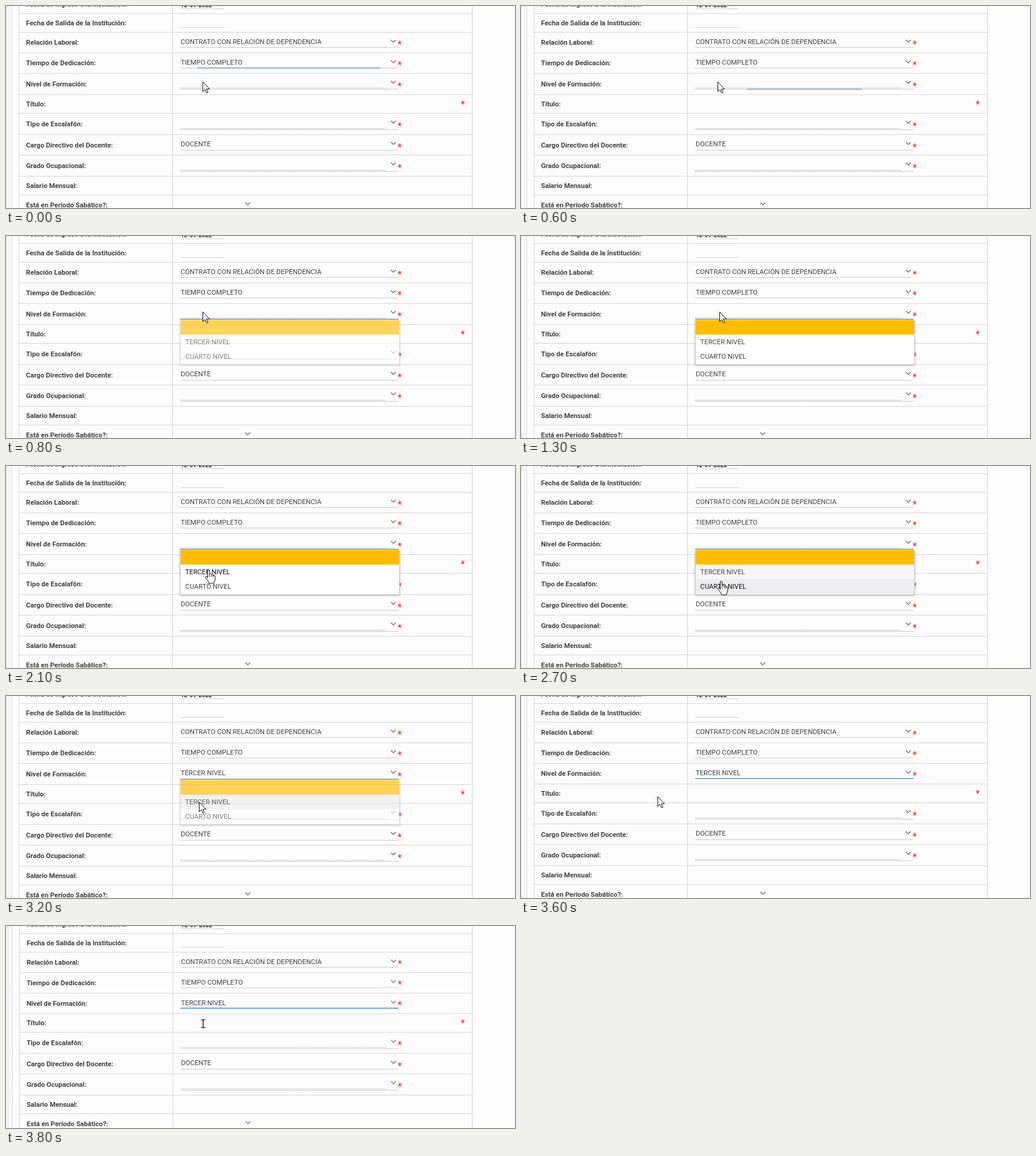
Write an HTML page with a canvas that moves like this. It is 839 px wide and 334 px high and loops after 3900 ms.

```html
<!DOCTYPE html>
<html lang="es">
<head>
<meta charset="utf-8">
<style>
html, body { margin: 0; width: 100%; height: 100%; overflow: hidden; background: #fdfdfd; }
canvas { display: block; }
</style>
</head>
<body>
<canvas id="stage" width="839" height="334"></canvas>
<script>
const stage = document.getElementById('stage');
const page = stage.getContext('2d');
const layer = document.createElement('canvas');
layer.width = stage.width;
layer.height = stage.height;
const menuLayer = layer.getContext('2d');
let ctx = page;

const LOOP = 3900, STEP = 100;
const FONT = '11.2px Roboto, sans-serif', BOLD = 'bold ' + FONT;
const INK = '#424242', BLUE = '#3a73ad', BORDER = '#d6d6d6';

// base: label baseline, field: value baseline, line: field underline
const rows = [
  { label: 'Fecha de Ingreso a la Institución:', base: 1, bottom: 12 },
  { label: 'Fecha de Salida de la Institución:', base: 32, bottom: 43 },
  { label: 'Relación Laboral:', base: 64, bottom: 77, field: 63, line: 68, value: 'CONTRATO CON RELACIÓN DE DEPENDENCIA' },
  { label: 'Tiempo de Dedicación:', base: 98, bottom: 111, field: 97, line: 102, value: 'TIEMPO COMPLETO' },
  { label: 'Nivel de Formación:', base: 133, bottom: 146, field: 131, line: 137 },
  { label: 'Título:', base: 166, bottom: 177 },
  { label: 'Tipo de Escalafón:', base: 199, bottom: 212, field: 197, line: 204 },
  { label: 'Cargo Directivo del Docente:', base: 234, bottom: 246, field: 232, line: 238, value: 'DOCENTE' },
  { label: 'Grado Ocupacional:', base: 268, bottom: 281, field: 266, line: 273 },
  { label: 'Salario Mensual:', base: 301, bottom: 312 },
  { label: 'Está en Período Sabático?:', base: 333, bottom: 346 }
];

const pointer = [
  [0, 324, 125, arrow], [1100, 324, 125, arrow], [1300, 327, 125, arrow],
  [1800, 327, 125, arrow], [1900, 329, 134, arrow], [2000, 332, 154, hand],
  [2100, 334, 171, hand], [2400, 335, 176, hand], [2600, 332, 186, hand],
  [2700, 330, 190, hand], [2800, 330, 192, hand], [3000, 333, 176, hand],
  [3100, 333, 176, hand], [3200, 318, 175, arrow], [3500, 232, 168, arrow],
  [3600, 225, 166, arrow], [3700, 275, 163, arrow], [3800, 324, 161, beam]
];
const menuAlpha = [[600, 0], [700, .3], [800, .64], [900, .9], [1000, 1], [3100, 1], [3400, 0]];
const hoverThird = [[2100, 0], [2400, 1], [2500, 1], [2700, .45], [2850, 0], [2900, .3], [3000, 1]];
const hoverFourth = [[2500, 0], [2700, 1], [2850, 1], [3000, 0]];

// Piecewise linear value at time t; column selects the number in each key
function track(keys, t, column = 1) {
  if (t <= keys[0][0]) return keys[0][column];
  for (let i = 1; i < keys.length; i++) {
    const a = keys[i - 1], b = keys[i];
    if (t <= b[0]) return a[column] + (b[column] - a[column]) * (t - a[0]) / (b[0] - a[0]);
  }
  return keys[keys.length - 1][column];
}

function rect(x, y, w, h, color) {
  ctx.fillStyle = color;
  ctx.fillRect(x, y, w, h);
}

function text(str, x, y, font = FONT, color = INK) {
  ctx.font = font;
  ctx.fillStyle = color;
  ctx.fillText(str, x, y);
}

function stroke(points, color, width) {
  ctx.beginPath();
  points.forEach(([x, y]) => ctx.lineTo(x, y));
  ctx.strokeStyle = color;
  ctx.lineWidth = width;
  ctx.stroke();
}

function chevron(x, y) {
  stroke([[x - 3.5, y - 1.5], [x + .5, y + 2.5], [x + 4.5, y - 1.5]], '#666', 1.2);
}

function required(x, y) {
  ctx.textAlign = 'center';
  text('*', x, y + 6.5, '16px Roboto, sans-serif', '#e0282e');
  ctx.textAlign = 'left';
}

function dotted(y) {
  ctx.setLineDash([1, 1]);
  stroke([[287, y + .5], [627, y + .5]], '#a4a4a4', 1);
  ctx.setLineDash([]);
}

function shape(path) {
  ctx.lineJoin = 'round';
  ctx.fillStyle = '#fff';
  ctx.fill(path);
  ctx.strokeStyle = '#111';
  ctx.lineWidth = 1;
  ctx.stroke(path);
  ctx.lineJoin = 'miter';
}

function arrow() {
  shape(new Path2D('M.5 .5V16.5L4.1 13.1L6.6 18.8L9 17.8L6.5 12.2H11.5Z'));
}

function hand() {
  shape(new Path2D('M-1.5 14V2Q-1.5 .5 0 .5T1.5 2V8.5Q2 7.2 3.6 7.6T5 9Q6.6 8 8 9.6' +
    'Q10.5 9 10.8 11.5V16Q10.8 18 9 20V23H0V20.5L-5 14Q-6 12 -4.5 11.4T-1.5 14Z'));
  for (const x of [1.5, 5, 8]) stroke([[x, 9.5], [x, 12.5]], '#111', 1);
}

function beam() {
  stroke([[1, -6], [1, 7]], '#222', 1.5);
  for (const y of [-6, 7]) stroke([[-2.5, y], [4.5, y]], '#222', 1.3);
}

function drawPage() {
  const edge = ctx.createLinearGradient(0, 0, 9, 0);
  edge.addColorStop(0, '#f1eff1');
  edge.addColorStop(1, '#fbfafb');
  rect(0, 0, 9, 340, edge);
  rect(9, 0, 1, 340, '#dbd7db');
  for (const x of [21, 274, 768]) rect(x, 0, 1, 340, BORDER);
}

function drawRow(row, i, t) {
  const lift = t >= 3400 && i >= 4 ? 1 : 0;
  const isLevel = i === 4;
  const value = isLevel && t >= 3100 ? 'TERCER NIVEL' : row.value;
  const base = row.base - lift;
  text(row.label, 33, base, BOLD);
  rect(21, row.bottom - lift, 748, 1, BORDER);
  if (i < 2) rect(288, i ? 35 : 4, 71, 1, '#cfcfcf');
  if (i === 5) required(753, 161 - lift);
  if (i === 10) chevron(398, 326.5 - lift);
  if (!row.line) return;

  const line = row.line - lift;
  const field = row.field - (isLevel ? 0 : lift);
  rect(287, line, 360, 1, '#cbcbcb');
  if (value) text(value, 288, field);
  else dotted(line - 2);
  chevron(638, field - 5.5);
  required(649, base - 2);
  if (i === 3 && t < 600) rect(316, line, 301, 1, BLUE);
  if (isLevel && t >= 600) {
    const half = t < 700 ? 95 : 180;
    const last = t >= 3800;
    rect(467 - half, last ? line - .5 : line, half * 2, last ? 1.5 : 1, last ? '#529bdb' : BLUE);
  }
}

function menuItem(label, y, hover, active) {
  ctx.globalAlpha = hover;
  rect(288, y, 360, 24, '#eeedef');
  ctx.globalAlpha = 1;
  text(label, 295.6, y + 16, FONT, active ? '#0c0c0c' : INK);
}

function paintMenu(t) {
  ctx.clearRect(0, 0, layer.width, layer.height);
  ctx.shadowColor = 'rgba(0,0,0,.35)';
  ctx.shadowBlur = 3;
  ctx.shadowOffsetY = 1;
  rect(287, 139, 362, 74, '#d0d0d0');
  ctx.shadowColor = 'transparent';
  rect(288, 139, 360, 73, '#fff');
  rect(288, 139, 360, 24, '#ffbd00');
  menuItem('TERCER NIVEL', 163, track(hoverThird, t), t >= 2100 && t < 2600 || t >= 2900);
  menuItem('CUARTO NIVEL', 187, track(hoverFourth, t), t >= 2600 && t < 2900);
}

// The menu is painted on its own layer so that it fades as one piece
function drawMenu(t) {
  const alpha = track(menuAlpha, t);
  if (!alpha) return;
  ctx = menuLayer;
  paintMenu(t);
  ctx = page;
  ctx.globalAlpha = alpha;
  ctx.drawImage(layer, 0, 0);
  ctx.globalAlpha = 1;
}

function drawPointer(t) {
  const draw = pointer.filter(key => key[0] <= t).pop()[3];
  ctx.save();
  ctx.translate(Math.round(track(pointer, t, 1)), Math.round(track(pointer, t, 2)));
  draw();
  ctx.restore();
}

function render(t) {
  rect(0, 0, 839, 334, '#fdfdfd');
  ctx.save();
  // The page zooms out very slightly just before the loop ends
  const zoom = track([[3600, 0], [3800, 1]], t);
  ctx.translate(768, 0);
  ctx.scale(1 - .0013 * zoom, 1 - .0035 * zoom);
  ctx.translate(-768, 0);
  drawPage();
  rows.forEach((row, i) => drawRow(row, i, t));
  text('12-09-2022', 288, 2, 'bold 9.6px Roboto, sans-serif', '#222');
  drawMenu(t);
  ctx.restore();
  drawPointer(t);
}

function tick() {
  const t = performance.now() % LOOP;
  render(Math.floor(t / STEP) * STEP);
  requestAnimationFrame(tick);
}
tick();
</script>
</body>
</html>
```
